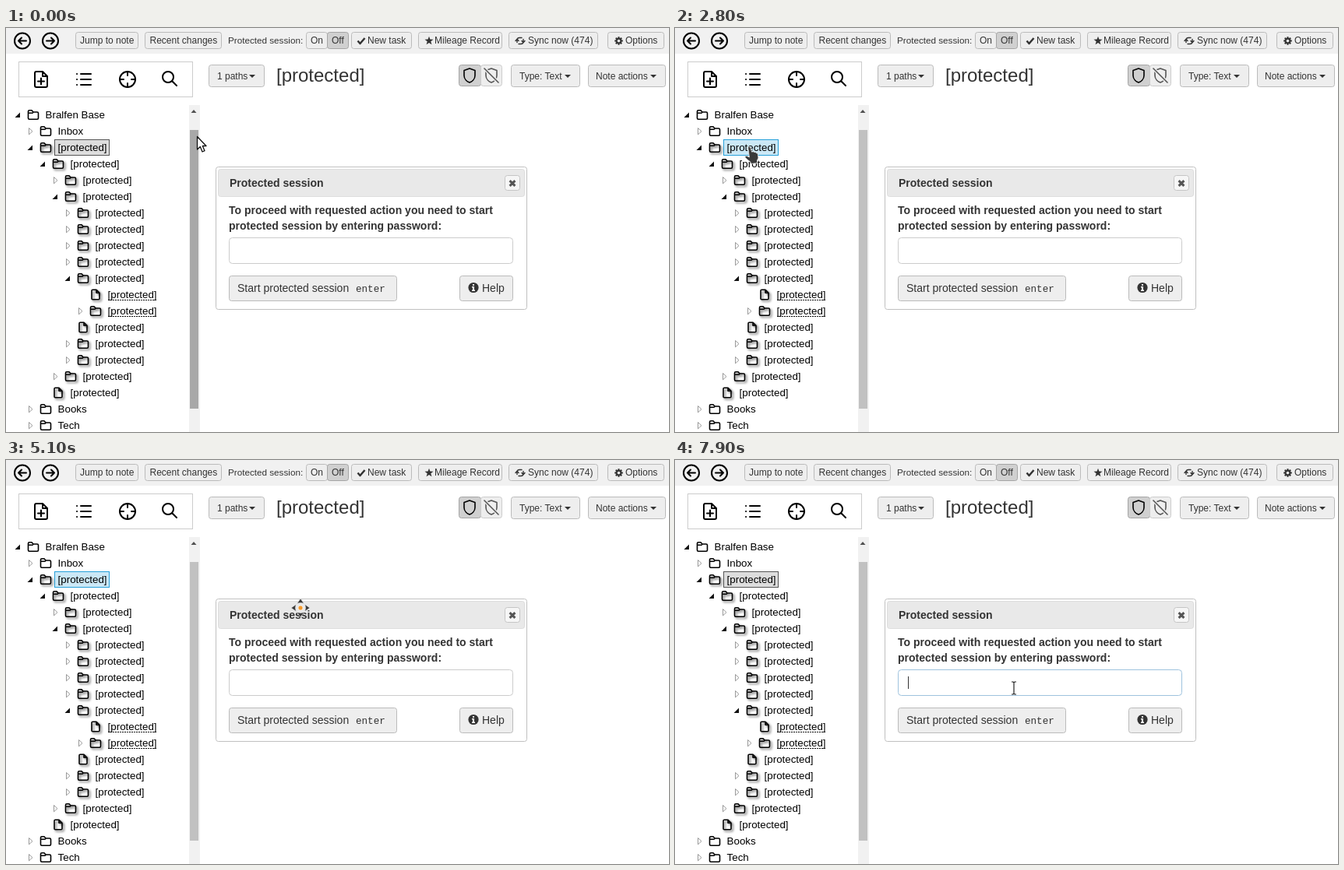
An HTML page for the animation above (8 s loop, 851 by 519 pixels).

```html
<!DOCTYPE html>
<html lang="en">
<head>
<meta charset="utf-8">
<title>Protected session</title>
<style>
  html, body { margin: 0; width: 100%; height: 100%; overflow: hidden; background: #fff; }
  svg { display: block; width: 851px; height: 519px; }
  text { font: 12px "Liberation Sans", Arial, sans-serif; fill: #333; white-space: pre; }
  .tree text { font-size: 13.333px; fill: #000; }
  .mid text, text.mid { font-size: 14px; }
  text.bold { font-size: 14px; font-weight: bold; }
  text.title { font-size: 24px; }
  text.mono { font: 12.6px "Liberation Mono", monospace; }
  .btn { fill: #eee; stroke: #bbb; }
  .on { fill: #d0d0d0; stroke: #a5a5a5; }
  .line { fill: none; stroke: #000; stroke-width: 2; stroke-linecap: round; stroke-linejoin: round; }
  .thin { stroke-width: 1.6; }
  .ink { fill: #333; }
  .shade { filter: drop-shadow(2px 2px 1.5px rgba(0, 0, 0, .6)); }
  .hover { fill: #e5f3fb; stroke: #70c0e7; }
</style>
</head>
<body>
<svg id="stage" viewBox="0 0 851 519"></svg>
<script>
const LOOP = 8000, STEP = 100;

const rect = (x, y, w, h, attrs = '') =>
  `<rect x="${x + .5}" y="${y + .5}" width="${w}" height="${h}" ${attrs}/>`;
const text = (x, y, s, cls = '') => `<text x="${x}" y="${y}" class="${cls}">${s}</text>`;
const path = (d, cls = 'line', extra = '') => `<path d="${d}" class="${cls}" ${extra}/>`;
const at = (x, y, s, cls = '') => `<g transform="translate(${x} ${y})" class="${cls}">${s}</g>`;
const button = (x, y, w, h, label, tx, ty, cls = 'btn') =>
  rect(x, y, w, h, `rx="3" class="${cls}"`) + text(tx, ty, label);
const caret = (x, y) => path(`M${x} ${y}h8l-4 4z`, 'ink');

// Icons, each centred on 0,0
const spokes = (n, d) => Array.from({ length: n }, (_, i) =>
  `<path d="${d}" transform="rotate(${i * 360 / n})"/>`).join('');
const starPath = 'M' + Array.from({ length: 10 }, (_, i) => {
  const a = i * Math.PI / 5, r = i % 2 ? 2.4 : 5.8;
  return `${(r * Math.sin(a)).toFixed(2)} ${(-r * Math.cos(a)).toFixed(2)}`;
}).join('L') + 'z';
const shield = 'M0 -9L7 -6.5V0C7 5 3 8 0 9C-3 8 -7 5 -7 0V-6.5z';
const icon = {
  arrow: '<circle r="10" class="line"/>' + path('M-5 0H5M1 -4L5 0L1 4'),
  newNote: path('M2 -10H-6Q-8 -10 -8 -8V8Q-8 10 -6 10H6Q8 10 8 8V-4zV-4H8M-4 2.5H4M0 -1.5V6.5'),
  list: path('M-4 -7H9M-4 0H9M-4 7H9') + path('M-9 -7h.1M-9 0h.1M-9 7h.1'),
  target: '<circle r="10" class="line"/>' + path('M0 -10V-5M0 10V5M-10 0H-5M10 0H5'),
  search: '<circle cx="-2" cy="-2" r="7" class="line"/>' + path('M3.5 3.5L9 9'),
  folder: path('M-6.5 4.2V-4.2Q-6.5 -5.7 -5 -5.7H-2L0 -3.5H5Q6.5 -3.5 6.5 -2V4.2Q6.5 5.7 5 5.7H-5Q-6.5 5.7 -6.5 4.2zM-6.5 -2.2H-1L0 -3.5', 'line thin'),
  file: path('M1 -6.3H-3.8Q-5 -6.3 -5 -5V5Q-5 6.3 -3.8 6.3H3.8Q5 6.3 5 5V-2.3zV-2.3H5', 'line thin'),
  check: path('M-4.5 0L-1.5 3.5L4.5 -3.5', 'line', 'style="stroke:#333;stroke-width:2.5;stroke-linecap:butt"'),
  star: path(starPath, 'ink'),
  sync: path('M-4 2V-1Q-4 -4 -1 -4H2M4 -2V1Q4 4 1 4H-2M-6 0L-4 -2.2L-2 0M6 0L4 2.2L2 0', 'line', 'style="stroke:#333;stroke-width:1.4"'),
  gear: '<circle r="2.9" fill="none" stroke="#333" stroke-width="2.2"/>' +
    `<g fill="#333">${spokes(8, 'M-1 -5.3h2v2h-2z')}</g>`,
  shield: path(shield, 'line thin'),
  shieldOff: path(shield, 'line thin', 'style="stroke:#555"') +
    path('M-9 -9L9 9', 'line', 'style="stroke:#eee;stroke-width:4"') +
    path('M-9 -9L9 9', 'line thin', 'style="stroke:#555"'),
  close: path('M-3.4 -3.4L3.4 3.4M3.4 -3.4L-3.4 3.4', 'line', 'style="stroke:#555;stroke-width:3;stroke-linecap:butt"'),
  info: '<circle r="6.6" fill="#333"/>' +
    path('M-1 -4.5h2v2h-2zM-2 -1.5H1V3H2V4.5H-2V3H-1V0H-2z', '', 'fill="#fff"'),
};

function header() {
  return '<rect width="851" height="33" fill="#f1f1f1"/>' +
    at(21, 16.5, `<g transform="scale(-1 1)">${icon.arrow}</g>`) + at(57, 16.5, icon.arrow) +
    button(89, 5, 80, 21, 'Jump to note', 95, 20) +
    button(178, 5, 98, 21, 'Recent changes', 184.5, 20) +
    `<text x="285" y="20" style="font-size:11.7px">Protected session:</text>` +
    button(385, 5, 27, 21, 'On', 391, 20) +
    button(412, 5, 27, 21, 'Off', 418, 20, 'on') +
    button(443, 5, 77, 21, 'New task', 464, 20) + at(456, 16.5, icon.check) +
    button(529, 5, 107, 21, 'Mileage Record', 550, 20) + at(543, 16.5, icon.star) +
    button(645, 5, 114, 21, 'Sync now (474)', 670, 20) + at(660, 16.5, icon.sync) +
    button(772, 5, 72, 21, 'Options', 795, 20) + at(786.5, 16.5, icon.gear);
}

function tools() {
  return rect(16, 43, 223, 45, 'fill="#fff" stroke="#ccc"') +
    at(45, 66, icon.newNote) + at(100, 66, icon.list) +
    at(156, 66, icon.target) + at(210, 65, icon.search) +
    button(260, 47, 71, 28, '1 paths', 271, 65.5) + caret(312, 60) +
    text(347, 69, '[protected]', 'title') +
    rect(581, 47, 28, 27, 'rx="3" class="on"') + rect(609, 47, 27, 27, 'rx="3" class="btn" style="stroke:#ccc"') +
    at(595, 61, icon.shield) + at(623, 61, icon.shieldOff) +
    button(648, 47, 88, 28, 'Type: Text', 659, 65.5) + caret(717, 60) +
    button(747, 47, 99, 28, 'Note actions', 757, 65.5) + caret(827, 60);
}

// Each row: level, state (o open, c closed, f file), name, s for shared
const rows = ['0o Bralfen Base', '1c Inbox', '1o', '2o', '3c', '3o', '4c', '4c', '4c', '4c',
  '4o', '5fs', '5cs', '4f', '4c', '4c', '3c', '2f', '1c Books', '1c Tech'];

function tree() {
  return rows.map((row, i) => {
    const [code, ...words] = row.split(' ');
    const x = 16 * code[0], y = 111.5 + 21 * i, kind = code[1], hidden = !words.length;
    let out = '';
    if (kind === 'o') out += path(`M${x + 18} ${y - 3}v6.5h-6.5z`, '', 'fill="#111"');
    if (kind === 'c') out += path(`M${x + 13.5} ${y - 4}l4.5 4.2l-4.5 4.2z`, '', 'fill="#fff" stroke="#999"');
    out += at(x + 35, y, kind === 'f' ? icon.file : icon.folder, hidden ? 'shade' : '');
    out += text(x + 50.6, y + 4.5, hidden ? '[protected]' : words.join(' '));
    if (code[2]) out += path(`M${x + 51} ${y + 7}h63`, '', 'stroke="#000" stroke-dasharray="2 1"');
    return out;
  }).join('');
}

function scrollbar() {
  return '<rect x="235" y="99" width="14" height="420" fill="#f1f1f1"/>' +
    path('M237.5 109h7l-3.5 -4z', '', 'fill="#505050"') +
    '<rect id="thumb" x="236" y="131" width="11" height="358"/>';
}

function dialog() {
  return rect(269, 178, 399, 183, 'rx="3" fill="#fff" stroke="#c0c0c0"') +
    rect(272, 181, 393, 35, 'rx="3" fill="#e9e9e9" stroke="#ddd"') +
    text(287, 204, 'Protected session', 'bold') +
    rect(640, 189, 19, 19, 'rx="3" fill="#f6f6f6" stroke="#c5c5c5"') + at(650, 199.5, icon.close) +
    text(286, 239, 'To proceed with requested action you need to start', 'bold') +
    text(286, 259, 'protected session by entering password:', 'bold') +
    rect(286, 269, 364, 33, 'id="field" rx="4" fill="#fff"') +
    '<path id="bar" d="M299.5 278v16" stroke="#333"/>' +
    `<g class="mid">${button(286, 318, 215, 32, 'Start protected session', 297, 339)}` +
    button(582, 318, 68, 32, 'Help', 611, 339) + '</g>' +
    text(449, 339, 'enter', 'mono') + at(600, 333.5, icon.info);
}

const pointers = {
  arrow: path('M.5 .5V17L4.3 13.5L7 20L10 18.7L7.3 12.5H12z', '', 'fill="#fff" stroke="#111" stroke-width="1.3" stroke-linejoin="round"'),
  hand: path('M-2.3 1.5Q-1 -.6 .8 1.2L2.6 7.2Q4.5 6 5.6 7.6Q7.4 6.9 8.2 8.6Q10 8.2 10.4 10.2L11 15L9.5 18V21.5L1.5 22.5L.8 20Q-3 17.5 -6 14.3Q-6.6 12 -4 12.2L-.6 14z', '',
    'fill="#3a3a3a" stroke="#eee" stroke-width=".8"'),
  move: `<g fill="#3a3a3a" stroke="#eee" stroke-width=".6">${spokes(4, 'M0 -12L4.5 -5.5Q0 -7.5 -4.5 -5.5z')}</g>` +
    '<circle r="3" fill="#f39a2d" stroke="#fff" stroke-width=".6"/>',
  beam: path('M-3 -8H-1L0 -7L1 -8H3M0 -7V7M-3 8H-1L0 7L1 8H3', '', 'fill="none" stroke="#222" stroke-width="1.2"'),
};

document.getElementById('stage').innerHTML = header() + tools() + scrollbar() +
  rect(62, 122, 41, 20, 'id="hoverTop" class="hover"') +
  rect(110, 248, 70, 20, 'id="hoverMid" class="hover"') +
  rect(62, 143, 70, 20, 'id="active"') +
  `<g class="tree">${tree()}</g>` + dialog() +
  '<g id="pointer">' + Object.keys(pointers).map(k => `<g id="${k}">${pointers[k]}</g>`).join('') + '</g>';

// Pointer path: time, x, y
const route = [
  [0, 245, 139], [500, 245, 139], [800, 163, 143], [900, 163, 143], [1000, 121, 143],
  [1100, 121, 143], [1300, 106, 154], [2700, 106, 154], [3000, 76, 148], [3100, 76, 148],
  [3200, 87, 148], [3300, 87, 148], [3500, 76, 148], [3600, 70, 149], [3800, 93, 153],
  [3900, 90, 153], [4000, 90, 153], [4200, 130, 251], [4300, 150, 215], [4700, 293, 190],
  [4900, 293, 190], [5100, 378, 190], [5300, 404, 200], [5500, 404, 200], [5700, 327, 193],
  [5900, 316, 228], [6000, 316, 228], [6100, 309, 236], [6200, 409, 241], [6300, 409, 241],
  [6700, 518, 252], [7200, 439, 265], [7500, 435, 293], [LOOP, 435, 293],
];
const shapes = [[0, 'arrow'], [1000, 'hand'], [4300, 'arrow'], [4700, 'move'], [5800, 'arrow'], [7400, 'beam']];

const el = id => document.getElementById(id);
const show = (id, on) => el(id).setAttribute('visibility', on ? 'visible' : 'hidden');
const paint = (id, name, value) => el(id).setAttribute(name, value);

function draw(t) {
  const i = route.findIndex(p => p[0] > t);
  const [t0, x0, y0] = route[i - 1], [t1, x1, y1] = route[i];
  const k = (t - t0) / (t1 - t0);
  paint('pointer', 'transform',
    `translate(${Math.round(x0 + (x1 - x0) * k)} ${Math.round(y0 + (y1 - y0) * k)})`);
  const shape = shapes.filter(s => s[0] <= t).pop()[1];
  Object.keys(pointers).forEach(name => show(name, name === shape));

  const treeFocus = t >= 2100 && t < 7900, fieldFocus = t >= 7900;
  paint('thumb', 'fill', t < 600 ? '#a8a8a8' : '#c1c1c1');
  paint('active', 'fill', treeFocus ? '#cbe8f6' : '#ddd');
  paint('active', 'stroke', treeFocus ? '#26a0da' : '#555');
  paint('field', 'stroke', fieldFocus ? '#9fc3de' : '#ccc');
  show('bar', fieldFocus);
  show('hoverTop', t >= 800 && t < 1000);
  show('hoverMid', t >= 4300 && t < 4400);
}

function tick() {
  draw(Math.floor(performance.now() % LOOP / STEP) * STEP);
  requestAnimationFrame(tick);
}
tick();
</script>
</body>
</html>
```
